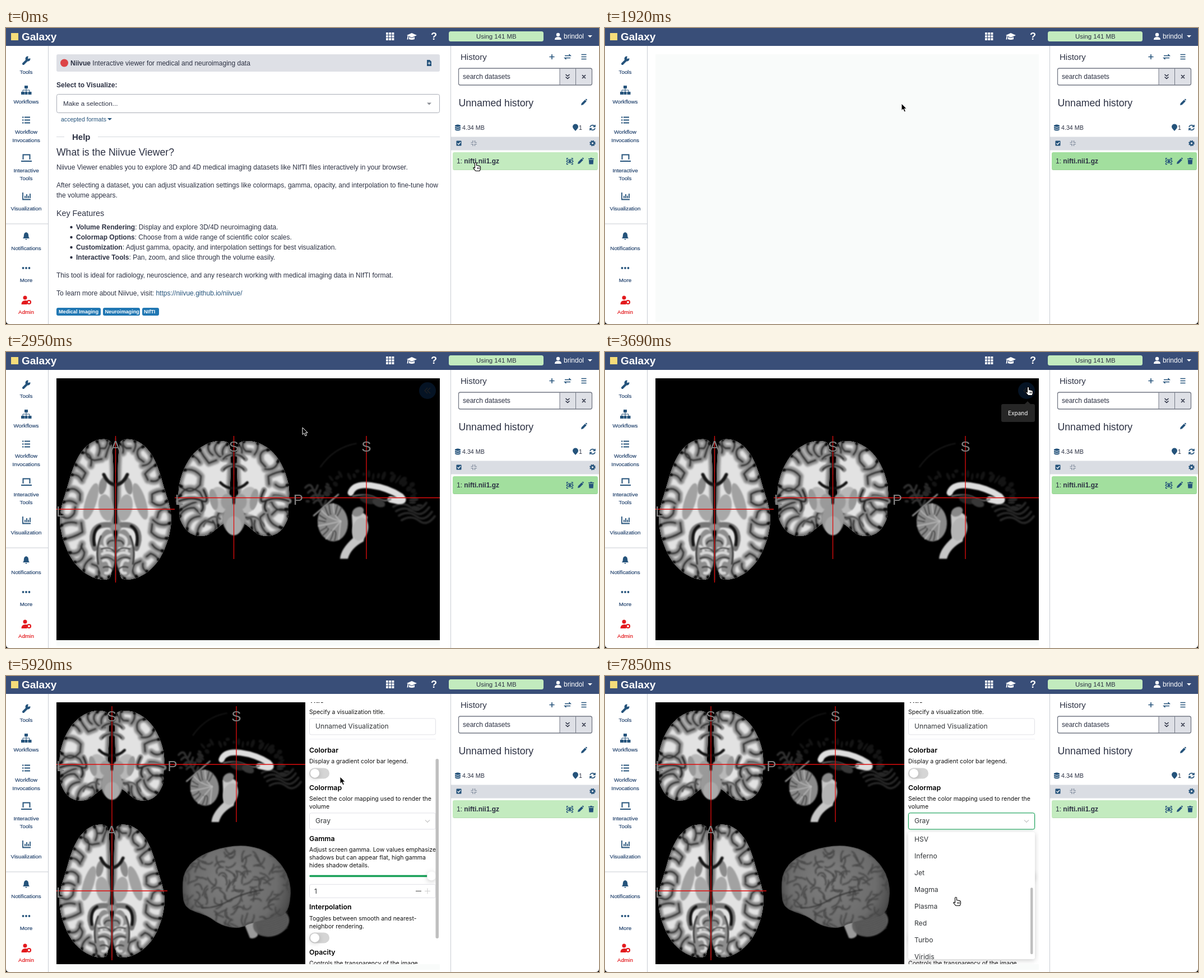
An HTML page with a canvas that plays this animation: 1058x529 px, repeating every 8 s.

```html
<!DOCTYPE html>
<html lang="en">
<head>
<meta charset="utf-8">
<title>Niivue in Galaxy</title>
<style>
html, body { margin: 0; width: 100%; height: 100%; overflow: hidden; background: #fff; }
svg, canvas, #view { position: absolute; left: 0; top: 0; }
#view { left: 90px; top: 47px; width: 684px; height: 478px; background: #f9fbfa; }
text { font: 12px "Liberation Sans", Arial, sans-serif; fill: #2c3143; white-space: pre; }
.bold { font-weight: 700; }
.nav text { font-size: 9.8px; fill: #25456f; stroke: #25456f; stroke-width: .2px; text-anchor: middle; }
.nav .admin { fill: #e31a1e; stroke: #e31a1e; }
.tag text { font-size: 9.15px; font-weight: 700; fill: #fff; }
.line { fill: none; stroke: #25537b; stroke-width: 1.6; }
.panel text { font: 10.5px Inter, sans-serif; fill: #111; }
.panel .head { font-size: 12.3px; font-weight: 600; fill: #000; }
.panel .value { font-size: 12.1px; fill: #333639; }
.panel .card text { fill: #25537b; }
.mark text { font-size: 26px; fill: #808080; text-anchor: middle; }
.mark path { stroke: #e00d0d; stroke-width: 1.3; }
.box { fill: #fff; stroke: #e0e0e6; }
.shadow { filter: drop-shadow(0 2px 5px #0003); }
</style>
</head>
<body>
<div id="view"><canvas id="rowScan" width="684" height="468"></canvas><canvas id="gridScan" width="684" height="468"></canvas></div>
<svg width="1058" height="529" viewBox="0 0 1058 529">
<defs>
  <path id="pencil" d="M-5 5l.8-3.6L2-4.800 4.800-2-1.400 4.200zM2.700-5.500l1-.7q.8-.4 1.600.4.900.900.300 1.700l-.8.8z"/>
  <path id="caret" d="M-4-2h8l-4 4z"/>
  <g id="switch"><rect x="541" width="36" height="19" rx="9.500" fill="#d5d5d5"/><circle class="shadow" cx="551" cy="9.500" r="8" fill="#fff"/></g>
  <circle id="round" r="15" fill="#2080f0" fill-opacity=".15"/>
  <clipPath id="panelClip"><path d="M534 47h240v468H534z"/></clipPath>
  <clipPath id="listClip"><path d="M541 279h226v227H541z"/></clipPath>
</defs>

<path fill="#394e78" d="M0 0h1058v32H0z"/>
<rect x="9" y="9" width="13" height="13" fill="#f5dc7a"/>
<text class="bold" x="28" y="22" style="font-size:19px;fill:#fff">Galaxy</text>
<g fill="#fff">
  <path d="M678 8h4v4h-4zm5.200 0h4v4h-4zm5.200 0h4v4h-4zM678 13h4v4h-4zm5.200 0h4v4h-4zm5.200 0h4v4h-4zM678 18h4v4h-4zm5.200 0h4v4h-4zm5.200 0h4v4h-4z"/>
  <path d="M715 13l9-4 9 4-9 4zM719 16l5 2 5-2v4q-5 2-10 0zM716.500 14l1.500.500-.500 6h-2z"/>
  <circle cx="985" cy="12" r="3.200"/><path d="M979 21q0-5 6-5t6 5z"/>
  <use href="#caret" x="1042" y="15"/>
</g>
<text class="bold" x="758" y="21" style="font-size:18px;fill:#fff">?</text>
<rect x="790" y="6" width="169" height="18" rx="3.500" fill="#c2ebbe"/>
<text x="839" y="19" style="font-size:11.400px">Using 141 MB</text>
<text x="995" y="19" style="fill:#fff">brindol</text>

<g class="nav" fill="#25537b">
  <path d="M31 64l6-6" stroke="#25537b" stroke-width="4" stroke-linecap="round"/><circle cx="39" cy="55" r="4.500"/><path d="M39 55l1-6 5 0v5z" fill="#fff"/>
  <path d="M33 103h6v5h-6zM27 114h6v5h-6zM33.500 114h5v5h-5zM39.500 114h6v5h-6z"/><path class="line" d="M36 107v7M30 114v-3h12v3" style="stroke-width:1"/>
  <path class="line" d="M29 159.500h2.500M33 159.500h10M29 164.500h2.500M33 164.500h10M29 169.500h2.500M33 169.500h10" style="stroke-width:2"/>
  <path class="line" d="M30.500 235v-8.500h12V235M27 238h19" style="stroke-width:2"/>
  <path class="line" d="M30 294v12.500h14M34 304v-4M37 304v-7M40 304v-4M43 304v-8" style="stroke-width:1.800"/>
  <path d="M30 376q2-2 2-6t4-5q4 1 4 5t2 6zM34 377h4q-2 3-4 0z"/>
  <circle cx="30.500" cy="429" r="1.900"/><circle cx="36" cy="429" r="1.900"/><circle cx="41.500" cy="429" r="1.900"/>
  <g fill="#e31a1e"><circle cx="34" cy="482" r="3.500"/><path d="M27.500 494q0-7 7-7 3 0 4 1l-1 6z"/><circle cx="41" cy="490" r="3" fill="none" stroke="#e31a1e" stroke-width="2.200"/></g>
  <path d="M75.500 32v497M0 350h75" stroke="#c9ccd3"/>
  <text x="36" y="82">Tools</text><text x="36" y="135">Workflows</text>
  <text x="36" y="189">Workflow</text><text x="36" y="204">Invocations</text>
  <text x="36" y="258">Interactive</text><text x="36" y="272">Tools</text>
  <text x="36" y="326">Visualization</text><text x="36" y="397">Notifications</text>
  <text x="36" y="454">More</text><text x="36" y="511" class="admin">Admin</text>
</g>

<g fill="#25537b">
  <path d="M793.500 32v497" stroke="#c9ccd3"/>
  <text x="811" y="57" style="font-size:15px">History</text>
  <path class="line" d="M969.500 51.500h9M974 47v9M997 49.500h10l-2.500-2.500M1007 53.500H997l2.500 2.500M1026.500 47.500h9M1026.500 51.500h9M1026.500 55.500h9"/>
  <rect x="807.500" y="72" width="238" height="30" rx="3" fill="#dee0e6"/>
  <path d="M808 72.500H988v29H808z" fill="#fff"/>
  <path d="M988 72v30M1016.500 72v30" stroke="#747985"/>
  <rect x="807.500" y="72" width="238" height="30" rx="3" fill="none" stroke="#747985" stroke-width="1.300"/>
  <text x="815" y="91">search datasets</text>
  <path class="line" d="M998.500 83l3.500 3 3.500-3M998.500 87.500l3.500 3 3.500-3M1028 84l6 6M1034 84l-6 6" style="stroke:#2c3143"/>
  <text x="807.500" y="140" style="font-size:17.700px">Unnamed history</text>
  <use href="#pencil" x="1031" y="133"/>
  <path d="M801 174q5-3 10 0v8q-5 3-10 0z"/><path d="M801 176.500q5 2 10 0M801 180q5 2 10 0" stroke="#fff" fill="none"/>
  <text x="814" y="182" style="font-size:10.700px">4.34 MB</text>
  <path d="M1016 184q-5-5-5-7.500a5 5 0 0 1 10 0q0 2.500-5 7.500z"/><text x="1022" y="182" style="font-size:10.700px">1</text>
  <path class="line" d="M1042 177a4.500 4.500 0 0 1 8-1.500M1051 173v3.500h-3.500M1051 179a4.500 4.500 0 0 1-8 1.500M1042 183v-3.500h3.500"/>
  <path d="M794 194.500h264v24H794z" fill="#dadde3"/>
  <rect x="803.500" y="201.500" width="9" height="9" rx="1"/><path d="M805.500 206l2 2 3.500-4" fill="none" stroke="#fff" stroke-width="1.300"/>
  <path d="M829.500 204.500h3.500V201M836.500 201v3.500h3.500M829.500 207.500h3.500v3.500M836.500 211v-3.500h3.500" fill="none" stroke="#7c8799" stroke-width="1.200"/>
  <circle cx="1046.500" cy="206" r="3" fill="none" stroke="#25537b" stroke-width="2.400"/><circle cx="1046.500" cy="206" r="4.600" fill="none" stroke="#25537b" stroke-width="1.500" stroke-dasharray="2 1.610"/>
  <rect id="tile" x="797" y="222" width="259" height="32" rx="3"/>
  <path d="M798 253.500h257" stroke="#0001"/>
  <text x="804" y="242">1: <tspan class="bold">nifti.nii1.gz</tspan></text>
  <path class="line" d="M1000.500 235.500v-2.500h2.500M1008.500 233h2.500v2.500M1011 241v2.500h-2.500M1003 243.500h-2.500V241M1000 238.200q6-6.500 12 0-6 6.500-12 0z" style="stroke-width:1.300"/><circle cx="1006" cy="238.200" r="2.200"/>
  <use href="#pencil" x="1025" y="238"/>
  <path d="M1039 233h3l.500-1h3l.500 1h3v1.500h-10zM1039.800 235.500h8.400l-.600 8h-7.200z"/>
</g>

<g id="intro">
  <rect x="90" y="47" width="684" height="31" rx="3" fill="#dee0e6"/>
  <circle cx="104" cy="62.500" r="7" fill="#dc4446"/>
  <text x="115" y="67"><tspan class="bold">Niivue</tspan> Interactive viewer for medical and neuroimaging data</text>
  <path d="M751 57h5l3 3v8h-8z" fill="#25537b"/><path d="M755 60.500v5M752.500 63h5" stroke="#fff"/>
  <text class="bold" x="90" y="106">Select to Visualize:</text>
  <rect x="90.500" y="118.500" width="683" height="33" rx="3" fill="#fff" stroke="#a9adb6"/>
  <text x="102" y="139" style="font-size:11.700px">Make a selection...</text>
  <use href="#caret" x="755" y="135.500" fill="#8a8d94"/>
  <text x="98" y="167" style="font-size:10.550px;fill:#25537b">accepted formats</text><use href="#caret" x="185" y="163" fill="#25537b"/>
  <path d="M90 194.500h14M164 194.500h610" stroke="#d6d9df"/>
  <text class="bold" x="118" y="200" style="font-size:15px">Help</text>
  <text x="90" y="228" style="font-size:17.600px">What is the Niivue Viewer?</text>
  <text x="90" y="253">Niivue Viewer enables you to explore 3D and 4D medical imaging datasets like NIfTI files interactively in your browser.</text>
  <text x="90" y="285">After selecting a dataset, you can adjust visualization settings like colormaps, gamma, opacity, and interpolation to fine-tune how</text>
  <text x="90" y="303">the volume appears.</text>
  <text x="90" y="336" style="font-size:14.300px">Key Features</text>
  <path d="M116.500 356h.01M116.500 374h.01M116.500 392h.01M116.500 410h.01" stroke="#2c3143" stroke-width="4.400" stroke-linecap="round"/>
  <text x="125" y="360"><tspan class="bold">Volume Rendering</tspan>: Display and explore 3D/4D neuroimaging data.</text>
  <text x="125" y="378"><tspan class="bold">Colormap Options</tspan>: Choose from a wide range of scientific color scales.</text>
  <text x="125" y="396"><tspan class="bold">Customization</tspan>: Adjust gamma, opacity, and interpolation settings for best visualization.</text>
  <text x="125" y="414"><tspan class="bold">Interactive Tools</tspan>: Pan, zoom, and slice through the volume easily.</text>
  <text x="90" y="446">This tool is ideal for radiology, neuroscience, and any research working with medical imaging data in NIfTI format.</text>
  <text x="90" y="478">To learn more about Niivue, visit: <tspan fill="#25537b">https://niivue.github.io/niivue/</tspan></text>
  <g class="tag" fill="#2077b3">
    <rect x="90" y="500" width="79" height="14" rx="3"/><rect x="173" y="500" width="66" height="14" rx="3"/><rect x="243" y="500" width="30" height="14" rx="3"/>
    <text x="94" y="510">Medical Imaging</text><text x="176.500" y="510">Neuroimaging</text><text x="246" y="510">NIfTI</text>
  </g>
</g>

<g id="rowMarks" class="mark">
  <path d="M195.500 150v262M90 281h211M406.500 150v220M301 260.500h473M643 150v220"/>
  <text x="195.500" y="177">A</text><text x="406.500" y="178">S</text><text x="643" y="178">S</text>
  <text x="97" y="294">L</text><text x="309" y="273">L</text><text x="521.500" y="273">P</text>
</g>
<g id="gridMarks" class="mark">
  <path d="M189 54v454M90 158h444M411 54v207M90 384h198"/>
  <text x="188.500" y="81">S</text><text x="411" y="81">S</text><text x="97" y="170">L</text>
  <text x="297" y="170">P</text><text x="188.500" y="286">A</text><text x="97" y="396">L</text>
</g>
<g id="expand"><use href="#round" x="752" y="69"/><path d="M752 64l-5 5 5 5M757 64l-5 5 5 5" fill="none" stroke="#222" stroke-width="1.200"/></g>
<g id="tip" class="panel"><rect x="707" y="93" width="60" height="32" rx="3" fill="#262626"/><path d="M749 93l5-5 5 5z" fill="#262626"/><text x="719" y="113" style="font-size:10px;fill:#fff">Expand</text></g>

<g id="panel" class="panel" clip-path="url(#panelClip)">
  <path d="M534 47h240v468H534z" fill="#fff"/>
  <g id="form">
    <text x="541" y="75" style="font-size:14.600px">Charts</text>
    <path d="M595 68l2.500 2.500 4-5" fill="none" stroke="#18a058" stroke-width="1.300"/><circle cx="598" cy="68" r="6.300" fill="none" stroke="#18a058" stroke-width="1.300"/>
    <use href="#round" x="715" y="69"/><use href="#round" x="752" y="69"/>
    <path d="M712 73h-1.500a3 3 0 0 1 0-6 4.600 4.600 0 0 1 9 0 3 3 0 0 1 0 6H718M715 75v-6M712.800 71l2.200-2.200 2.200 2.200M747 64l5 5-5 5M752 64l5 5-5 5" fill="none" stroke="#222" stroke-width="1.200"/>
    <rect x="541" y="91" width="226" height="82" rx="3" fill="#eff7fe"/>
    <circle cx="580" cy="130" r="23" fill="#d7191f"/>
    <g class="card"><text class="head" x="615" y="115">Niivue</text><text x="615" y="131">Interactive viewer for</text><text x="615" y="145">medical and neuroimaging</text><text x="615" y="159">data</text></g>
    <text class="head" x="541" y="193">Title</text><text x="541" y="213">Specify a visualization title.</text>
    <rect class="box" x="541.500" y="220.500" width="225" height="29" rx="3"/><text class="value" x="552" y="239">Unnamed Visualization</text>
    <path d="M541 257.500h226" stroke="#efeff5"/>
    <text class="head" x="541" y="282">Colorbar</text><text x="541" y="301">Display a gradient color bar legend.</text>
    <use href="#switch" y="309"/>
    <text class="head" x="541" y="349">Colormap</text><text x="541" y="368">Select the color mapping used to render the</text><text x="541" y="382">volume</text>
    <rect class="box" id="select" x="541.500" y="389.500" width="225" height="29" rx="3"/><text class="value" x="552" y="408">Gray</text>
    <path d="M748 402l4 4 4-4" fill="none" stroke="#c2c2c2" stroke-width="1.200"/>
    <text class="head" x="541" y="440">Gamma</text><text x="541" y="459">Adjust screen gamma. Low values emphasize</text><text x="541" y="473">shadows but can appear flat, high gamma</text><text x="541" y="487">hides shadow details.</text>
    <path d="M543 502h216" stroke="#18a058" stroke-width="3.500" stroke-linecap="round"/><circle class="shadow" cx="759" cy="502" r="8" fill="#fff"/>
    <rect class="box" x="541.500" y="517" width="225" height="24" rx="3"/><text class="value" x="550" y="533.500">1</text>
    <path d="M731 529h10" stroke="#444"/><path d="M747 529h10M752 524v10" stroke="#ccc"/>
    <text class="head" x="541" y="562">Interpolation</text><text x="541" y="582">Toggles between smooth and nearest-</text><text x="541" y="596">neighbor rendering.</text>
    <use href="#switch" y="603"/>
    <text class="head" x="541" y="643">Opacity</text><text x="541" y="662">Controls the transparency of the image.</text>
  </g>
  <rect id="bar" x="766.500" y="148" width="5.500" height="321" rx="2.700" fill="#bfbfbf"/>
  <g id="menu">
    <rect class="shadow" x="541" y="279" width="226" height="227" rx="3" fill="#fff"/>
    <g clip-path="url(#listClip)"><g id="list"></g><rect id="thumb" x="759" width="4.500" height="119" rx="2.200" fill="#bfbfbf"/></g>
  </g>
</g>

<g id="ghost"><rect class="shadow" x="16" y="15" width="109" height="31" rx="4" fill="#fff"/><path d="M30 31l12-7-2 11-4-2-2.500 3-.500-4 6-6-7.500 6z" fill="#2c3143"/><text class="bold" x="49" y="35">nifti.nii1.gz</text></g>
<path id="arrow" d="M0 0v12.500l2.900-2.600L5 15l2.400-1-2.100-4.800H9.200z" stroke="#fff"/>
<path id="hand" d="M-1.500 1.500Q0-1 1.500 1.500V5.500L4 6l2.500.600q2 .200 2 2.400V12L7 15.500H0L-4.200 10.500q0-2 2.700-.500zM3.500 9v3M6 9v3" fill="#fff" stroke="#000" stroke-width="1.100"/>
<path d="M0 523q0 6 6 6H0zM1058 523q0 6-6 6h6z"/>
</svg>

<script>
const el = id => document.getElementById(id);
let seed = 1;
const rand = () => (seed = seed * 16807 % 2147483647) / 2147483647;

// Closed smooth curve through the midpoints of a polygon
function smooth(p) {
  const path = new Path2D(), n = p.length;
  const mid = i => [(p[i % n][0] + p[(i + 1) % n][0]) / 2, (p[i % n][1] + p[(i + 1) % n][1]) / 2];
  path.moveTo(...mid(0));
  for (let i = 1; i <= n; i++) path.quadraticCurveTo(...p[i % n], ...mid(i));
  return path;
}
function along(p, u) {
  const s = u * (p.length - 1), i = Math.floor(s), f = s - i;
  return [0, 1].map(a => p[i][a] * (1 - f) + p[i + 1][a] * f);
}
function stroke(c, path, color, width) {
  c.strokeStyle = color; c.lineWidth = width; c.stroke(path);
}
function blob(c, x, y, rx, ry, turn, color) {
  c.fillStyle = color; c.beginPath(); c.ellipse(x, y, rx, ry, turn, 0, 7); c.fill();
}
function curve(c, d, color, width) { stroke(c, new Path2D(d), color, width); }
function mirrored(c, draw) {
  for (const side of [1, -1]) { c.save(); c.scale(side, 1); draw(); c.restore(); }
}

// White matter with a soft grey ribbon that follows the rim and the sulci
function hemisphere(c, rim, count, core) {
  const edge = smooth(rim), folds = new Path2D(), mouths = new Path2D();
  for (let i = 0; i < count; i++) {
    const [x, y] = along(rim, (i + .3 + .4 * rand()) / count), [cx, cy] = core(y);
    const depth = .3 + .24 * rand(), dx = (cx - x) * depth, dy = (cy - y) * depth;
    const bend = (rand() - .5) * 1.3, ex = x + dx, ey = y + dy;
    folds.moveTo(x, y);
    folds.quadraticCurveTo(x + dx / 2 - dy * bend, y + dy / 2 + dx * bend, ex, ey);
    const turn = .45 * Math.sign(bend);
    if (i % 2) folds.lineTo(ex + dx * .1 + dy * turn, ey + dy * .1 - dx * turn);
    mouths.moveTo(x - dx * .1, y - dy * .1);
    mouths.lineTo(x + dx * .12 - dy * bend * .15, y + dy * .12 + dx * bend * .15);
  }
  c.save(); c.clip(edge);
  c.fillStyle = '#e2e2e2'; c.fill(edge);
  c.filter = 'blur(1.5px)';
  for (const [color, width] of [['#b0b0b0', 14], ['#868686', 9]]) {
    stroke(c, folds, color, width); stroke(c, edge, color, width);
  }
  c.filter = 'blur(.8px)';
  stroke(c, edge, '#3a3a3a', 1.5);
  stroke(c, folds, '#2c2c2c', 2.4);
  stroke(c, mouths, '#0c0c0c', 5);
  c.restore();
}

function axial(c) {
  const rim = [[3,-116],[16,-127],[42,-122],[63,-102],[77,-72],[87,-36],[98,-2],[100,27],[92,62],[76,95],[50,119],[20,128],[3,120]];
  mirrored(c, () => {
    hemisphere(c, rim, 18, y => [28, y * .55]);
    blob(c, 44, -14, 10, 34, -.3, '#a2a2a2');
    blob(c, 23, -42, 7, 16, -.2, '#8c8c8c');
    blob(c, 17, -3, 13, 24, .2, '#a8a8a8');
    curve(c, 'M2 -44Q14 -46 21 -62', '#161616', 6);
    curve(c, 'M10 28Q34 26 40 42Q44 55 37 70', '#777', 10);
    curve(c, 'M28 30Q42 38 38 64', '#111', 5);
    blob(c, 16, 78, 17, 42, -.05, '#8e8e8e');
    curve(c, 'M26 48Q36 70 31 98', '#2a2a2a', 2.5);
    curve(c, 'M8 46Q22 50 19 62T7 70M2 82Q12 74 24 80M22 92Q12 88 10 102T18 114M26 66Q18 70 20 76', '#d6d6d6', 5);
    curve(c, 'M3 56Q12 55 14 62M2 76Q10 66 25 71M3 92Q14 82 26 88M4 108Q12 100 22 104', '#303030', 2);
  });
  curve(c, 'M0 -126V-68M0 -44V30M0 48V126', '#151515', 3);
  blob(c, 0, 32, 9, 6, 0, '#8d8d8d');
}

function coronal(c) {
  const rim = [[3,-94],[18,-103],[46,-99],[72,-81],[90,-52],[100,-16],[97,17],[98,38],[80,66],[48,70],[27,52],[10,40]];
  mirrored(c, () => {
    hemisphere(c, rim, 15, y => [27, -18 + y * .2]);
    blob(c, 25, 4, 17, 24, .3, '#b8b8b8');
    blob(c, 36, 3, 7, 19, .2, '#989898');
    blob(c, 12, 7, 11, 14, 0, '#9a9a9a');
    curve(c, 'M98 6Q75 -3 58 5T54 -14M58 5Q52 18 58 24', '#888', 10);
    curve(c, 'M98 6Q75 -3 58 5T54 -14M58 5Q52 18 58 24', '#222', 3);
    curve(c, 'M2 -17Q14 -17 24 -27', '#111', 5);
    curve(c, 'M4 -78q12 2 17 9M4 -58q12 2 16 8', '#888', 8);
    curve(c, 'M2 -78q12 2 17 9M2 -58q12 2 16 8', '#2a2a2a', 2.5);
    curve(c, 'M24 38q10 -8 20 0t10 13', '#555', 3);
  });
  blob(c, 0, 38, 20, 27, 0, '#999');
  blob(c, 0, 50, 14, 17, 0, '#aaa');
  curve(c, 'M0 -101V-43M0 -14V9', '#0a0a0a', 4);
}

function sagittal(c) {
  // Faint cortex around the midline
  for (let i = 0; i < 34; i++) {
    const a = Math.PI * (1.02 + i / 34 * 1.1), r = 30 * rand();
    blob(c, 3 + Math.cos(a) * (108 - r), 10 + Math.sin(a) * (60 - r * .4), 3 + 6 * rand(), 2 + 3 * rand(), a, i < 7 || i > 28 ? '#282828' : '#141414');
  }
  for (let i = 0; i < 4; i++) {
    curve(c, `M${48 + i * 5} ${16 + i * 8}q17 -10 31 1t28 -8`, '#262626', 4);
    curve(c, `M${-109 + i * 5} ${-18 + i * 9}q9 -10 13 1t9 -5`, '#303030', 4);
  }
  curve(c, 'M-82 -55Q-58 -90 -18 -97', '#202020', 1.5);
  curve(c, 'M-94 32L-50 -6', '#999', 2.5);
  curve(c, 'M-28 -9Q-22 -26 8 -22T61 -3Q71 7 57 6L43 3', '#dedede', 11);
  curve(c, 'M-24 -3Q0 -8 16 0T43 3', '#666', 3);
  blob(c, 4, 3, 16, 8, .2, '#252525');
  blob(c, 22, 9, 12, 7, .4, '#383838');
  c.fillStyle = '#c6c6c6';
  c.fill(new Path2D('M-24 72Q-46 92 -47 109H-33Q-28 90 -5 78L2 34Q-12 18 -26 30Z'));
  blob(c, -11, 56, 14, 21, .25, '#b4b4b4');
  blob(c, -15, 25, 11, 8, -.5, '#888');
  blob(c, -60, 44, 27, 34, -.1, '#8a8a8a');
  for (let i = 0; i < 15; i++) {
    const a = 1.15 + i * .3, x = Math.cos(a), y = Math.sin(a);
    const d = `Q${-57 + x * 14 + y * 4} ${45 + y * 14} ${-60 + x * 26} ${44 + y * 33}`;
    if (i % 3) curve(c, `M${-60 + x * 13} ${44 + y * 15}` + d, '#2e2e2e', 1.4);
    else curve(c, 'M-46 42' + d, '#b8b8b8', 2);
  }
}

function surface(c) {
  c.fillStyle = '#999'; c.fill(new Path2D('M12 52L24 82Q32 85 38 78L43 48Z'));
  blob(c, 62, 55, 33, 24, -.3, '#606060');
  for (let i = 0; i < 9; i++) curve(c, `M${33 + i} ${52 + i * 3}Q60 ${49 + i * 4} 91 ${32 + i * 4}`, '#484848', 1.2);
  const edge = smooth([[-97,0],[-95,-35],[-72,-62],[-28,-80],[20,-85],[63,-70],[93,-33],[99,8],[88,43],[62,47],[25,56],[5,66],[-28,60],[-52,42],[-92,30]]);
  const shade = c.createRadialGradient(-15, -25, 5, 0, -10, 108);
  shade.addColorStop(0, '#7e7e7e'); shade.addColorStop(.7, '#6c6c6c'); shade.addColorStop(1, '#404040');
  c.save(); c.clip(edge); c.fillStyle = shade; c.fill(edge);
  for (let gy = -80; gy < 70; gy += 13) for (let gx = -95; gx < 100; gx += 17) {
    let x = gx + rand() * 10, y = gy + rand() * 8, a = rand() * 6.3;
    const groove = new Path2D(), turn = rand() - .5; groove.moveTo(x, y);
    for (let i = 0; i < 5; i++) {
      a += turn + (rand() - .5) * .8; x += Math.cos(a) * 4; y += Math.sin(a) * 4; groove.lineTo(x, y);
    }
    stroke(c, groove, '#50505066', 4); stroke(c, groove, '#424242', 1.3);
  }
  curve(c, 'M-62 28Q-38 30 -14 16T48 -4', '#303030', 2);
  c.restore();
}

function paint(id, views) {
  const c = el(id).getContext('2d');
  c.fillRect(0, 0, 684, 468);
  c.lineCap = c.lineJoin = 'round';
  c.filter = 'blur(.8px)';
  for (const [draw, x, y, scale] of views) {
    seed = 77;
    c.setTransform(scale, 0, 0, scale, x - 90, y - 47);
    draw(c);
  }
}
paint('rowScan', [[axial, 195.5, 281, 1], [coronal, 406.5, 260.5, 1], [sagittal, 643, 260.5, 1]]);
paint('gridScan', [[coronal, 189, 158, .945], [sagittal, 411, 158, .945], [axial, 189, 384, .945], [surface, 411, 386, 1]]);

const colormaps = 'Blue Cividis Cool Gray Green Hot HSV Inferno Jet Magma Plasma Red Turbo Viridis'.split(' ');
el('list').innerHTML = colormaps.map((name, i) =>
  `<text class="value" x="552" y="${303 + i * 30}"${name === 'Gray' ? ' style="fill:#18a058"' : ''}>${name}</text>`).join('');

// Pointer stops: step, x, y
const route = [[-9,838,240],[0,838,240],[3,545,149],[5,529,135],[14,529,135],[18,735,80],[19,755,62],[22,755,62],
  [26,644,331],[32,644,331],[34,596,180],[36,600,225],[39,626,255],[40,626,255],[44,626,395],[99,626,395]];
function pointer(k) {
  const i = route.findIndex(stop => stop[0] > k), a = route[i - 1], b = route[i];
  const f = (k - a[0]) / (b[0] - a[0]);
  return [a[1] + (b[1] - a[1]) * f, a[2] + (b[2] - a[2]) * f];
}
const show = (id, on) => el(id).style.display = on ? '' : 'none';
const move = (id, x, y) => el(id).setAttribute('transform', `translate(${x} ${y})`);

function frame() {
  // The screen refreshes in steps of about 148 ms
  const k = Math.floor((performance.now() % 8000 - 880) / 147.8);
  const row = k >= 14 && k < 20, grid = k >= 20;
  const hand = k < 0 || k >= 19 && k <= 22 || k >= 39;
  const [x, y] = pointer(k);
  show('intro', k < 7); show('view', k >= 7);
  show('rowScan', row); show('rowMarks', row);
  show('gridScan', grid); show('gridMarks', grid); show('panel', grid);
  show('expand', k >= 9 && k < 20); show('tip', k === 19);
  show('ghost', k >= 1 && k < 5);
  show('hand', hand); show('arrow', !hand);
  for (const id of ['hand', 'arrow', 'ghost']) move(id, x, y);
  el('tile').style.fill = k >= 0 && k < 20 ? '#a2df9e' : '#c3ebbf';

  move('form', 0, k < 29 ? 0 : k < 30 ? -72 : -144.6);
  show('bar', k >= 29 && k < 39);
  el('bar').style.opacity = k < 37 ? 1 : .5;
  el('select').style.stroke = k >= 40 ? '#18a058' : '';
  el('select').style.filter = k >= 40 ? 'drop-shadow(0 0 1.5px #18a05866)' : '';
  show('menu', k >= 41);
  const scroll = k < 44 ? 0 : k < 46 ? 45 : k < 47 ? 120 : 187;
  move('list', 0, -scroll);
  el('thumb').setAttribute('y', 281 + scroll * .52);
  requestAnimationFrame(frame);
}
frame();
</script>
</body>
</html>
```
